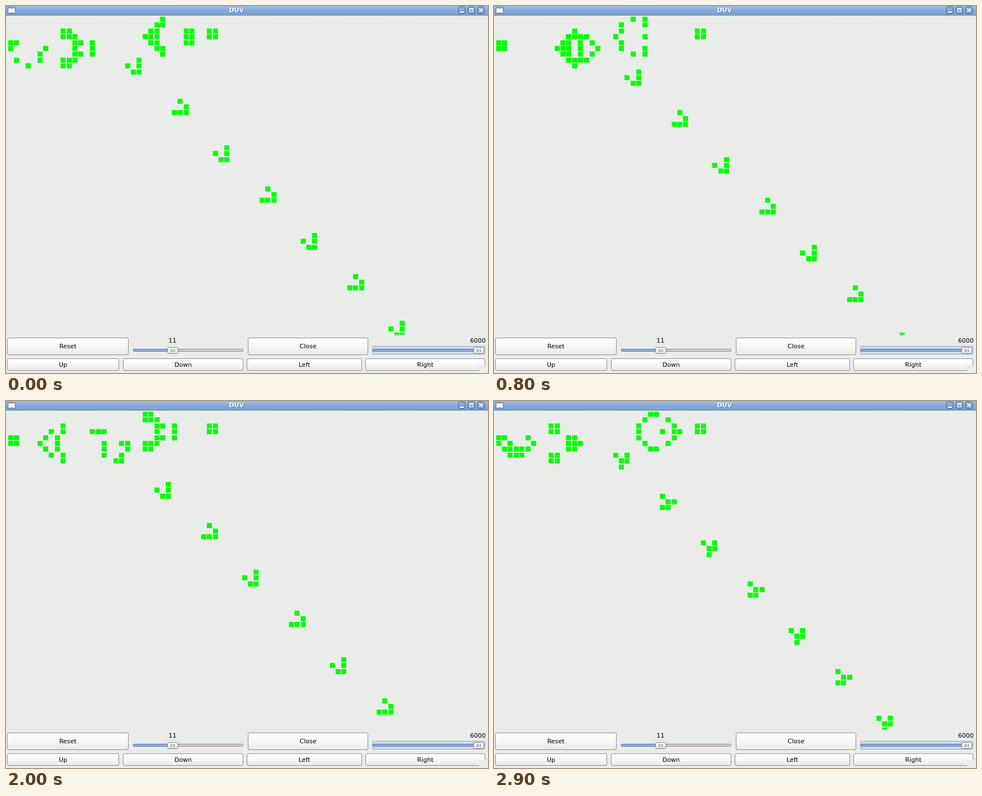
These frames come from a looping animation (857 by 653 pixels, 3000 ms). An HTML page with a canvas:

```html
<!DOCTYPE html>
<html lang="en">
<head>
<meta charset="utf-8">
<title>Life</title>
<style>
html, body { margin: 0; width: 100%; height: 100%; overflow: hidden; background: #e9ece9; }
canvas { display: block; }
</style>
</head>
<body>
<canvas id="stage" width="857" height="653"></canvas>
<script>
const ctx = document.getElementById('stage').getContext('2d');
const FONT = '11px "DejaVu Sans", sans-serif';

// Glider gun, one entry per row: the live columns.
const GUN = [
  [26], [26, 28], [9, 27, 29, 34, 35], [9, 10, 27, 30, 34, 35],
  [0, 1, 4, 5, 10, 11, 27, 29], [0, 1, 4, 5, 10, 11, 12, 26, 28],
  [4, 5, 10, 11, 19, 21, 26], [9, 10, 20, 21], [9, 20]
];
const PERIOD = 30, STEP_MS = 100, WARM_UP = 245;
const COLS = 120, ROWS = 105, PAD = 6;
const PITCH = 10.4, CELL = 9;

function nextGeneration(grid) {
  const next = new Uint8Array(grid.length);
  for (let y = 1; y < ROWS - 1; y++) {
    for (let x = 1; x < COLS - 1; x++) {
      const i = y * COLS + x, up = i - COLS, down = i + COLS;
      const n = grid[up - 1] + grid[up] + grid[up + 1] + grid[i - 1] + grid[i + 1] +
                grid[down - 1] + grid[down] + grid[down + 1];
      next[i] = n === 3 || (n === 2 && grid[i]) ? 1 : 0;
    }
  }
  return next;
}

// Run until the glider trail fills the view, then keep one period.
function buildGenerations() {
  let grid = new Uint8Array(COLS * ROWS);
  GUN.forEach((cols, y) => cols.forEach(x => { grid[(y + PAD) * COLS + x + PAD] = 1; }));
  for (let i = 0; i < WARM_UP; i++) grid = nextGeneration(grid);
  return Array.from({ length: PERIOD }, () => {
    const current = grid;
    grid = nextGeneration(grid);
    return current;
  });
}

function rect(x, y, w, h, fill) {
  ctx.fillStyle = fill;
  ctx.fillRect(x, y, w, h);
}

function shade(y, h, ...colors) {
  const g = ctx.createLinearGradient(0, y, 0, y + h);
  colors.forEach((c, i) => g.addColorStop(i / (colors.length - 1), c));
  return g;
}

function box(x, y, w, h, radius, fill, stroke) {
  ctx.beginPath();
  ctx.roundRect(x + .5, y + .5, w - 1, h - 1, radius);
  ctx.fillStyle = fill;
  ctx.fill();
  ctx.strokeStyle = stroke;
  ctx.lineWidth = 1;
  ctx.stroke();
}

function text(str, x, y, align = 'center', color = '#000', font = FONT) {
  ctx.font = font;
  ctx.textAlign = align;
  ctx.fillStyle = color;
  ctx.fillText(str, x, y);
}

function button(label, x, y, w, h, baseline) {
  box(x, y, w, h, 2.5, shade(y, h, '#ffffff', '#f7f7f6', '#e8e9e7'), '#958b8b');
  text(label, x + w / 2, baseline);
}

function slider(x, w, handleX) {
  box(x, 610, w, 5, 1, '#d3d0ce', '#8f8585');
  box(x, 610, handleX - x + 4, 5, 1, shade(610, 5, '#7d9fd3', '#9bbce8'), '#5878ad');
  box(handleX, 607, 19, 12, 2.5, shade(607, 12, '#ffffff', '#e4e5e3'), '#8b8181');
  for (let i = 0; i < 3; i++) rect(handleX + 6 + i * 3, 610, 1, 6, '#777');
}

function titleBar() {
  rect(0, 0, 857, 17, shade(0, 17, '#9dbde6', '#86a9d9', '#7a9dcd'));
  rect(0, 16, 857, 1, '#6484b2');
  box(3, 2, 14, 11, 1, '#f4f4f2', '#5d6670');
  rect(4, 3, 12, 2, '#b9c6d8');
  const bold = 'bold 11px "DejaVu Sans", sans-serif';
  text('DUV', 411, 12, 'center', '#4f709f', bold);
  text('DUV', 410, 11, 'center', '#fff', bold);

  for (const x of [804, 821, 838]) {
    box(x, 1, 13, 13, 2.5, shade(1, 13, '#95b6e2', '#759aca'), '#45679a');
  }
  rect(807, 10, 7, 2, '#fff');
  ctx.strokeStyle = '#fff';
  ctx.strokeRect(824.5, 4.5, 6, 6);
  rect(824, 4, 7, 2, '#fff');
  ctx.lineWidth = 1.6;
  ctx.beginPath();
  ctx.moveTo(841.5, 4.5); ctx.lineTo(847.5, 10.5);
  ctx.moveTo(847.5, 4.5); ctx.lineTo(841.5, 10.5);
  ctx.stroke();
}

function controls() {
  button('Reset', 2, 590, 216, 31, 609);
  button('Close', 430, 590, 214, 31, 609);
  button('Up', 2, 627, 199, 22, 642);
  button('Down', 208, 627, 214, 22, 642);
  button('Left', 428, 627, 205, 22, 642);
  button('Right', 639, 627, 213, 22, 642);

  text('11', 296, 599);
  slider(226, 196, 287);
  text('6000', 853, 599, 'right');
  box(651, 605, 201, 15, 1, '#d3dced', '#8ba4ce');
  slider(652, 198, 831);

  // Resize grip: diagonal rows of dots.
  rect(841, 639, 12, 12, '#e9ece9');
  for (let r = 0; r < 4; r++) {
    for (let c = 3 - r; c < 4; c++) {
      rect(842 + c * 3, 640 + r * 3, 2, 2, '#fff');
      rect(842 + c * 3, 640 + r * 3, 1, 1, '#b5b3b0');
    }
  }
}

function cells(grid) {
  ctx.save();
  ctx.beginPath();
  ctx.rect(0, 17, 857, 568);
  ctx.clip();
  for (let y = 0; y < 55; y++) {
    for (let x = 0; x < 83; x++) {
      if (grid[(y + PAD) * COLS + x + PAD]) {
        rect(Math.floor(4 + x * PITCH), Math.floor(19.5 + y * PITCH), CELL, CELL, '#00ff00');
      }
    }
  }
  ctx.restore();
}

const generations = buildGenerations();
const start = performance.now();

function draw() {
  const elapsed = Math.max(0, performance.now() - start);
  rect(0, 0, 857, 653, '#e9ece9');
  titleBar();
  cells(generations[Math.floor(elapsed / STEP_MS) % PERIOD]);
  controls();
  requestAnimationFrame(draw);
}
draw();
</script>
</body>
</html>
```
